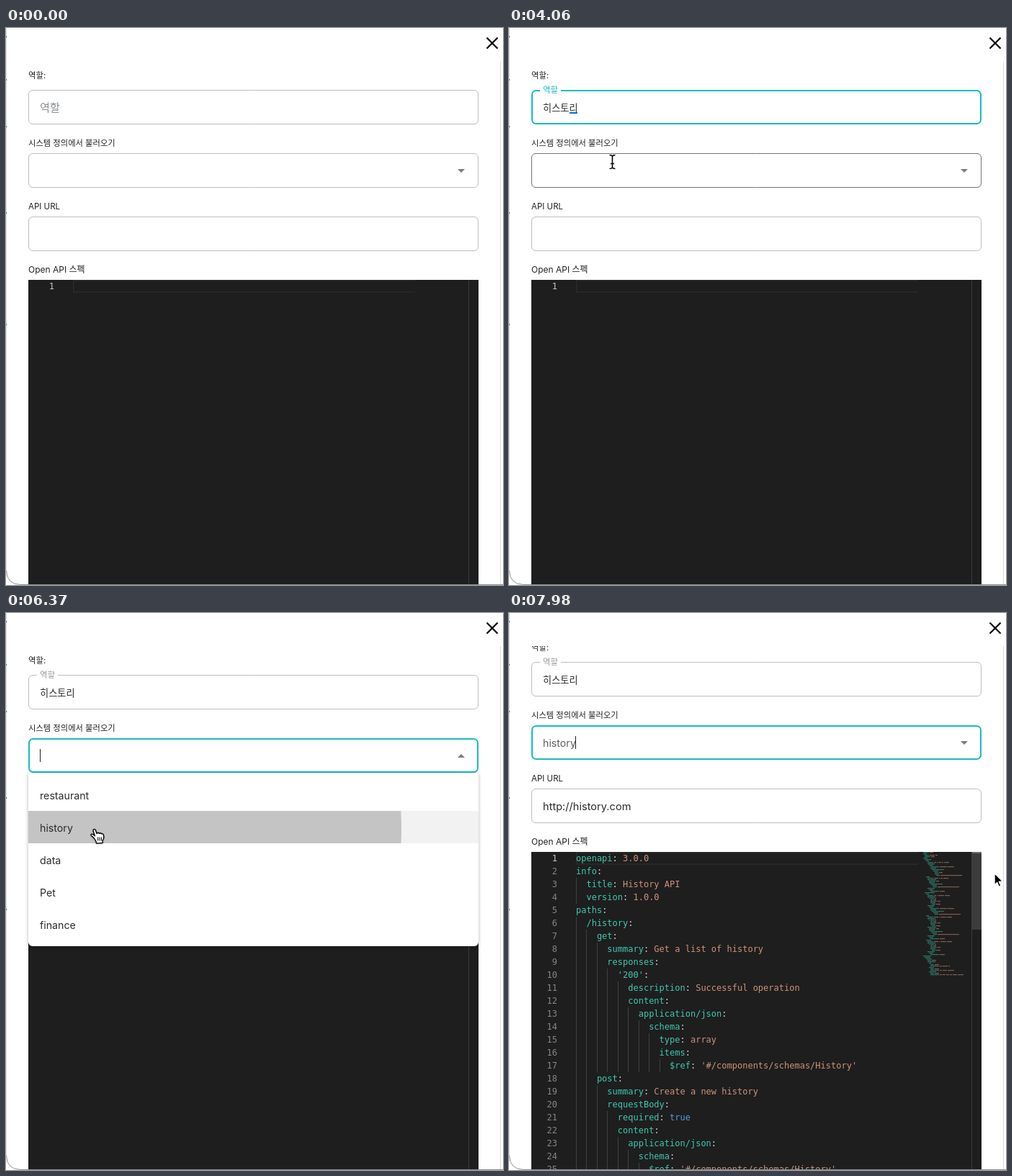
An HTML page with a canvas for the animation above (8 s loop, 690 by 774 pixels).

```html
<!DOCTYPE html>
<html lang="ko">
<head>
<meta charset="utf-8">
<style>
  html, body { margin: 0; width: 100%; height: 100%; overflow: hidden; background: #fff; }
  canvas { display: block; width: 690px; height: 774px; }
</style>
</head>
<body>
<canvas id="stage" width="690" height="774"></canvas>
<script>
const ctx = document.getElementById('stage').getContext('2d');
const LOOP = 8000, STEP = 70;
const SANS = 'Inter, "Noto Sans CJK KR", "Noto Sans CJK", sans-serif';
const MONO = '"DejaVu Sans Mono", monospace';
const TEAL = '#1abbbe', DARK = '#2b2b2b';
const LEFT = 31, WIDTH = 625, EDITOR_Y = 350, LINE = 18, CHAR = 7.225;

const REF = "$ref: '#/components/schemas/History'";
const indent = (n, lines) => lines.map(s => ' '.repeat(n * 2) + s);
const jsonBody = ['content:', '  application/json:', '    schema:'];
const refBody = [...jsonBody, '      ' + REF];
const request = ['requestBody:', ...indent(1, ['required: true', ...refBody])];
const idParam = ['parameters:', '  - name: id', ...indent(2, ['in: path', 'required: true', 'schema:', '  type: string'])];
const reply = (code, text, body = []) =>
  ['responses:', `  '${code}':`, ...indent(2, ['description: ' + text, ...body])];
const method = (name, summary, ...parts) => [name + ':', ...indent(1, ['summary: ' + summary, ...parts.flat()])];
const prop = (name, type, text) => [name + ':', '  type: ' + type, '  description: ' + text];

const code = [
  'openapi: 3.0.0', 'info:', '  title: History API', '  version: 1.0.0', 'paths:', '  /history:',
  ...indent(2, [
    ...method('get', 'Get a list of history',
      reply(200, 'Successful operation', [...jsonBody, ...indent(3, ['type: array', 'items:', '  ' + REF])])),
    ...method('post', 'Create a new history', request, reply(201, 'Created'))
  ]),
  '  /history/{id}:',
  ...indent(2, [
    ...method('get', 'Get a specific history', idParam, reply(200, 'Successful operation', refBody)),
    ...method('put', 'Update a specific history', idParam, request, reply(200, 'Updated')),
    ...method('delete', 'Delete a specific history', idParam, reply(204, 'Deleted'))
  ]),
  'components:', '  schemas:', '    History:', '      type: object', '      properties:',
  ...indent(4, [
    ...prop('id', 'string', 'The history ID'),
    ...prop('action', 'string', 'The action performed'),
    ...prop('timestamp', 'string', 'The date when the action occurred')
  ])
];

const TYPED = [[1750, 'ㅎ'], [1820, '히'], [1960, '힛'], [2030, '히스'], [2170, '히슽'],
  [2240, '히스토'], [2310, '히스톨'], [2450, '히스토리']];
const CARET_ON = [[1120, 1610], [1750, 2950], [3500, 4060], [4340, 4830], [5390, 5880], [6370, 6930], [7490, LOOP]];
const ITEMS = ['restaurant', 'history', 'data', 'Pet', 'finance'];

const clamp = v => Math.max(0, Math.min(1, v));
const span = (t, a, b) => clamp((t - a) / (b - a));
const mix = (a, b, p) => a + (b - a) * p;
const easeOut = p => 1 - (1 - p) ** 2;
const smooth = p => p * p * (3 - 2 * p);

function text(s, x, y, size, color, family = SANS, align = 'left') {
  ctx.font = `${size}px ${family}`;
  ctx.fillStyle = color;
  ctx.textAlign = align;
  ctx.fillText(s, x, y);
}
function rect(x, y, w, h, color) {
  ctx.fillStyle = color;
  ctx.fillRect(x, y, w, h);
}
function shape(points, fill, close = true) {
  ctx.beginPath();
  points.forEach(([x, y]) => ctx.lineTo(x, y));
  if (close) ctx.closePath();
  if (fill) { ctx.fillStyle = fill; ctx.fill(); }
}

function field(y, state) {
  const w = state === 'focus' ? 2 : 1;
  ctx.beginPath();
  ctx.roundRect(LEFT + w / 2, y + w / 2, WIDTH - w, 48 - w, 5.5);
  ctx.lineWidth = w;
  ctx.strokeStyle = { focus: TEAL, hover: '#747474', idle: '#bebebe' }[state];
  ctx.stroke();
}

// Pointer hotspot over time; null while hidden
function pointer(t) {
  if (t < 70 || (t >= 1750 && t < 2870)) return null;
  if (t < 910) {
    const p = easeOut(span(t, 70, 560));
    return [mix(533, 232, p), mix(768, 134, p)];
  }
  if (t < 2800) {
    const p = smooth(span(t, 840, 1120));
    return [mix(232, 240.5, p), mix(134, 121.5, p)];
  }
  if (t < 4900) {
    const p = smooth(span(t, 2800, 3290));
    return [mix(240.5, 143.5, p), mix(121.5, 186, p)];
  }
  if (t < 7000) {
    const a = span(t, 4970, 5180), b = easeOut(span(t, 5180, 5530));
    return [mix(mix(143.5, 132, a), 123.5, b), mix(mix(186, 267.5, a), 299.5, b)];
  }
  const p = smooth(span(t, 7000, 7700)), q = 1 - p;
  return [123.5 * q * q + 700 * p * q + 674 * p * p, 299.5 * q * q + 1900 * p * q + 361.5 * p * p];
}

function drawIBeam() {
  ctx.beginPath();
  for (const d of [-1, 1]) {
    ctx.moveTo(-4, 9.5 * d);
    ctx.quadraticCurveTo(0, 9.5 * d, 0, 7 * d);
    ctx.quadraticCurveTo(0, 9.5 * d, 4, 9.5 * d);
  }
  ctx.moveTo(0, -8); ctx.lineTo(0, 8);
  ctx.moveTo(-2.5, 2.5); ctx.lineTo(2.5, 2.5);
  ctx.lineWidth = 3.6; ctx.strokeStyle = '#fff'; ctx.stroke();
  ctx.lineWidth = 1.6; ctx.strokeStyle = '#000'; ctx.stroke();
}
function drawHand() {
  ctx.beginPath();
  ctx.moveTo(-1.5, 13);
  ctx.lineTo(-5.5, 9.5);
  ctx.quadraticCurveTo(-6, 6.5, -2.5, 8.3);
  ctx.lineTo(-.2, 10.2);
  ctx.lineTo(-2.6, 2.8);
  ctx.quadraticCurveTo(-1.6, -.6, .8, 2);
  ctx.lineTo(2.6, 7);
  ctx.quadraticCurveTo(4.6, 4.6, 6, 7);
  ctx.quadraticCurveTo(8, 5.2, 9, 7.4);
  ctx.quadraticCurveTo(11.6, 6.6, 12, 9.5);
  ctx.quadraticCurveTo(13, 14, 10.6, 16.5);
  ctx.lineTo(10.6, 20); ctx.lineTo(2, 20.6); ctx.lineTo(1.6, 18);
  ctx.closePath();
  ctx.fillStyle = '#fff';
  ctx.shadowColor = 'rgba(0,0,0,.35)'; ctx.shadowBlur = 3; ctx.shadowOffsetY = 1;
  ctx.fill();
  ctx.shadowColor = 'transparent';
  ctx.lineWidth = 1.4; ctx.strokeStyle = '#000'; ctx.stroke();
  ctx.beginPath();
  for (const x of [4, 6.4, 8.8]) { ctx.moveTo(x, 12); ctx.lineTo(x + .3, 17); }
  ctx.lineWidth = 1; ctx.stroke();
}
function drawArrow() {
  shape([[0, 0], [0, 16.5], [3.7, 13], [6.3, 19], [9, 17.8], [6.4, 12], [11.5, 11.5]], '#000');
  ctx.lineWidth = 1.4; ctx.strokeStyle = '#fff'; ctx.stroke();
}
function drawPointer(pos, menuOpen) {
  const [x, y] = pos;
  ctx.save();
  ctx.translate(x, y);
  ctx.lineJoin = 'round';
  if (x > 656) drawArrow();
  else if (menuOpen && y > 222) drawHand();
  else drawIBeam();
  ctx.restore();
}

function codeLine(line, y) {
  const depth = line.search(/\S/);
  for (let k = 0; k < depth; k += 2) rect(Math.round(93 + k * CHAR), y, 1, LINE, '#404040');
  const [, dash, key, value] = line.trim().match(/^(- )?(.*?):(?: (.*))?$/);
  let x = 93 + depth * CHAR;
  const put = (s, color) => { text(s, x, y + 13, 12, color, MONO); x += s.length * CHAR; };
  if (dash) put(dash, '#d4d4d4');
  put(key, '#3dc9b0');
  put(':', '#d4d4d4');
  if (value) put(' ' + value, value === 'true' ? '#569cd6' : '#ce9178');
}
function miniLine(line, y) {
  const split = line.indexOf(':');
  for (const word of line.matchAll(/\S+/g))
    rect(575 + word.index, y, word[0].length, 1.2, word.index <= split ? 'rgba(61,201,176,.5)' : 'rgba(206,145,120,.55)');
}
function drawEditor(t, filled) {
  rect(LEFT, EDITOR_Y, WIDTH, 467, '#1e1e1e');
  ctx.strokeStyle = '#2b2b2b';
  ctx.lineWidth = 1.5;
  shape([[568, 350.7], [93.7, 350.7], [93.7, 367], [568, 367]], null, false);
  ctx.stroke();
  rect(642, EDITOR_Y, 1, 467, '#3a3a3a');
  const lines = filled ? code : [''];
  lines.slice(0, 26).forEach((line, i) => {
    const y = EDITOR_Y + i * LINE;
    text(i + 1, 67, y + 13, 12, i ? '#858585' : '#c6c6c6', MONO, 'right');
    if (line) codeLine(line, y);
  });
  if (!filled) return;
  code.forEach((line, i) => miniLine(line, EDITOR_Y + i * 2));
  rect(642, EDITOR_Y, 14, 108, t < 7700 ? '#4d4d4d' : '#3c3c3c');
  rect(643, EDITOR_Y, 13, 2, '#6a6a6a');
}

function drawRole(t, caret, pos) {
  const focused = t >= 1050 && t < 4270;
  const hovered = t >= 910 && t < 1050;
  field(86, focused ? 'focus' : hovered ? 'hover' : 'idle');
  const p = smooth(span(t, 1000, 1190));
  if (p > 0) rect(43, 85, 29 * p, 4, '#fff');
  text('역할', 47, mix(115.5, 89.5, p), mix(15.2, 11.4, p), focused ? TEAL : p ? '#9c9c9c' : '#8a9096');

  const typed = TYPED.filter(([at]) => t >= at).pop()?.[1] ?? '';
  text(typed, 47, 115.5, 13.2, DARK);
  const end = 47 + Math.round(typed.length * 12.1);
  if (typed && t < 4270) rect(end - 11, 117, 11, 2, '#0a6cdb');
  if (caret && focused) rect(end, 101, 1, 18, '#000');
}

function drawSelect(t, caret, filled, menuOpen, pos) {
  const focused = t >= 4270;
  const hovered = pos && t >= 2870 && pos[1] > 174;
  field(174, focused ? 'focus' : hovered ? 'hover' : 'idle');
  const d = menuOpen ? -1 : 1;
  shape([[627, 198.5 - 2.5 * d], [637, 198.5 - 2.5 * d], [632, 198.5 + 2.5 * d]], '#7b7b7b');
  if (filled) text('history', 47, 204, 14.2, '#5c5f62');
  if (caret && focused) rect(filled ? 92 : 47, 189, 1, 18, '#222');
}

function drawMenu(t) {
  const alpha = span(t, 4270, 4480) * (1 - span(t, 6440, 6650));
  if (!alpha) return;
  ctx.save();
  ctx.globalAlpha = alpha;
  ctx.beginPath();
  ctx.roundRect(LEFT, 222, WIDTH, 241, [0, 0, 6, 6]);
  ctx.shadowColor = 'rgba(0,0,0,.3)'; ctx.shadowBlur = 5; ctx.shadowOffsetY = 1;
  ctx.fillStyle = '#fff';
  ctx.fill();
  ctx.shadowColor = 'transparent';
  if (t >= 6300) {
    ctx.save();
    ctx.beginPath();
    ctx.rect(LEFT, 275, WIDTH, 45);
    ctx.clip();
    rect(LEFT, 275, WIDTH, 45, '#f2f2f2');
    ctx.beginPath();
    ctx.arc(124, 300, mix(150, 700, span(t, 6300, 6440)), 0, 7);
    ctx.fillStyle = '#c4c4c4';
    ctx.fill();
    ctx.restore();
  }
  ITEMS.forEach((item, i) => text(item, 47, 259 + i * 45, 14.2, DARK));
  ctx.restore();
}

function drawFrame() {
  ctx.strokeStyle = '#d9d9d9';
  ctx.lineWidth = 1;
  shape([[686.5, 46], [686.5, 774]], null, false);
  ctx.stroke();
  // Panel corner and edge over the page behind it
  ctx.beginPath();
  ctx.moveTo(0, 750); ctx.lineTo(0, 774); ctx.lineTo(20, 774);
  ctx.quadraticCurveTo(1, 773, .5, 752);
  ctx.fillStyle = '#fff';
  ctx.fill();
  ctx.beginPath();
  ctx.moveTo(.5, 0); ctx.lineTo(.5, 754);
  ctx.strokeStyle = '#dedede';
  ctx.stroke();
  ctx.beginPath();
  ctx.moveTo(.5, 754);
  ctx.quadraticCurveTo(1, 773, 20, 773.5);
  ctx.lineTo(690, 773.5);
  ctx.strokeStyle = '#8f8f8f';
  ctx.stroke();
  for (const y of [12, 72, 137, 257, 412]) rect(0, y - 1, 1, 2, '#3d6fc4');
  ctx.beginPath();
  ctx.moveTo(667.5, 13.5); ctx.lineTo(682.5, 28.5);
  ctx.moveTo(682.5, 13.5); ctx.lineTo(667.5, 28.5);
  ctx.strokeStyle = '#000';
  ctx.lineWidth = 2.2;
  ctx.stroke();
}

function draw(t) {
  const pos = pointer(t);
  const caret = CARET_ON.some(([a, b]) => t >= a && t < b);
  const filled = t >= 6440;
  const menuOpen = t >= 4270 && t < 6440;

  rect(0, 0, 690, 774, '#fff');
  ctx.save();
  ctx.beginPath();
  ctx.rect(0, 46, 686, 728);
  ctx.clip();
  if (t >= 7980) ctx.translate(0, -18);
  text('역할:', LEFT, 69.5, 11.4, '#222');
  text('시스템 정의에서 불러오기', LEFT, 163.5, 11.3, '#222');
  text('API URL', LEFT, 252, 11.5, '#222');
  text('Open API 스펙', LEFT, 340, 12, '#222');
  drawRole(t, caret, pos);
  drawSelect(t, caret, filled, menuOpen, pos);
  field(262, filled && pos[1] < 310 ? 'hover' : 'idle');
  if (filled) text('http://history.com', 47, 292, 14.6, DARK);
  drawEditor(t, filled);
  drawMenu(t);
  ctx.restore();

  drawFrame();
  if (pos) drawPointer(pos, menuOpen);
}

function tick(now) {
  const t = now % LOOP;
  draw(Math.floor(t / STEP) * STEP);
  requestAnimationFrame(tick);
}
requestAnimationFrame(tick);
</script>
</body>
</html>
```
